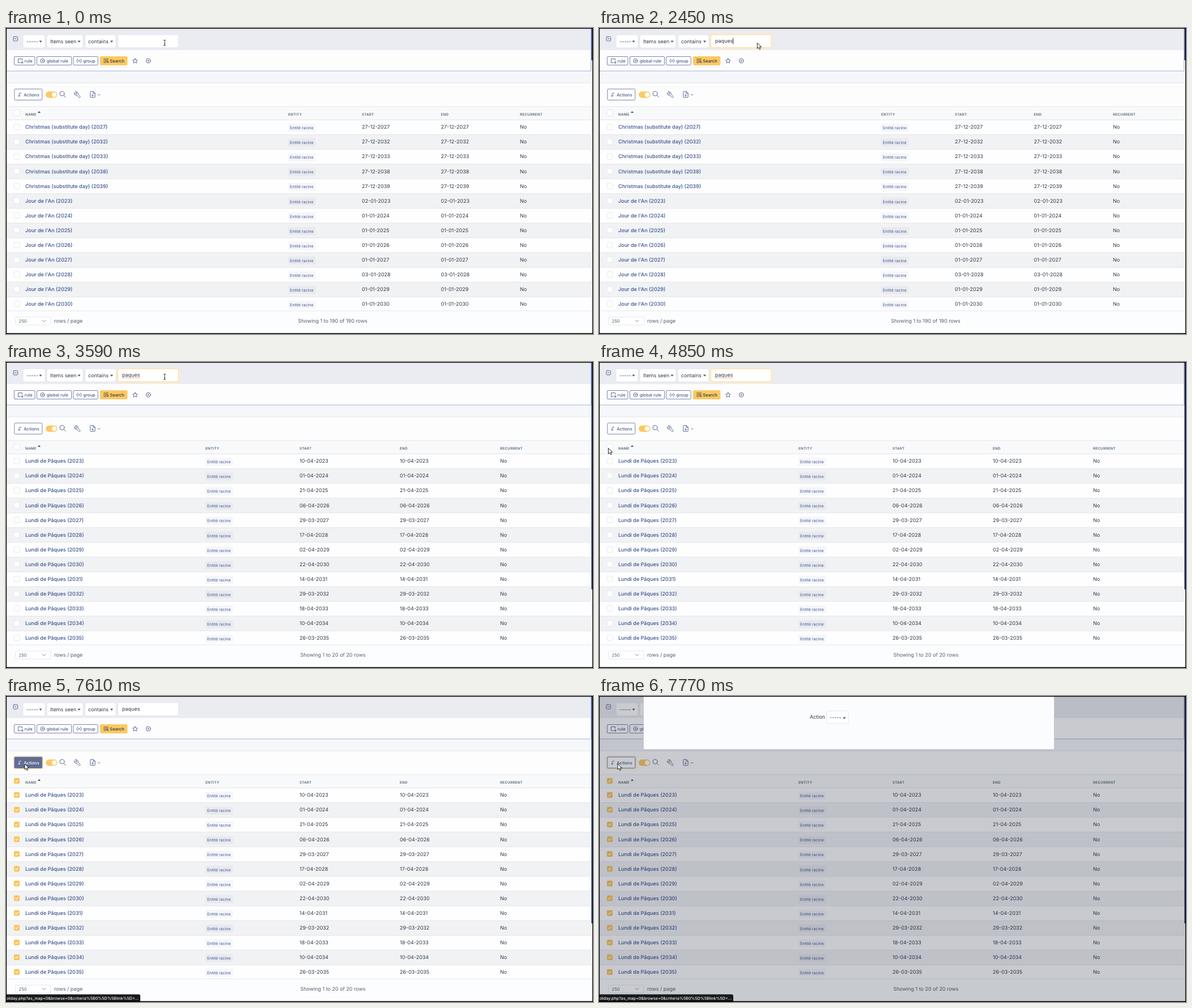
Animation of 1036x541 px, one loop 7.99 s. Source, as an HTML page:

```html
<!DOCTYPE html>
<html lang="en">
<head>
<meta charset="utf-8">
<title>Table search</title>
<style>
  html, body { margin: 0; width: 100%; height: 100%; overflow: hidden; background: #000; }
  svg { display: block; width: 100%; height: 100%; }
  text { font: 400 8.97px Inter, sans-serif; fill: #303846; white-space: pre; text-rendering: geometricPrecision; }
  .name { font-size: 9.05px; font-weight: 500; fill: #39528f; }
  .badge { font-size: 7.1px; fill: #465b93; }
  .head { font-size: 6.2px; font-weight: 600; letter-spacing: .04em; fill: #5c6474; }
  .btn { font-size: 7.6px; font-weight: 500; fill: #4a5a8a; text-anchor: middle; }
  .foot { fill: #565d6b; }
  .icon { fill: none; stroke: #4a5a8a; stroke-width: .9; stroke-linecap: round; stroke-linejoin: round; }
  .box { fill: #fff; stroke: #dfe2e8; stroke-width: .8; }
  .outline { fill: #fff; stroke: #6b78a1; stroke-width: .9; }
  .line { stroke: #e2e5e9; stroke-width: 1; }
  .gold { fill: #fcc960; }
  .halo { fill: none; stroke: #fcebc6; stroke-width: 2.4; }
</style>
</head>
<body>
<svg viewBox="0 0 1036 541">
  <defs>
    <path id="down" d="M-2.6-1.4H2.6L0 1.7Z" fill="#4b5262"/>
    <g id="empty"><rect x="-5" y="-5" width="10" height="10" rx="2" class="box"/></g>
    <g id="checked">
      <rect x="-5" y="-5" width="10" height="10" rx="1.8" fill="#f9c458"/>
      <path d="M-2.5 .1-.8 1.8 2.6-1.6" fill="none" stroke="#fff" stroke-width="1.2"/>
    </g>
  </defs>

  <rect width="1036" height="541" fill="#fdfdfe"/>
  <rect width="1033" height="39" fill="#ebecf2"/>
  <rect y="76" width="1033" height="21" fill="#f5f7fb"/>
  <path d="M0 76H1032.5V0" fill="none" stroke="#a3b2d6"/>
  <path d="M0 97H1033" class="line"/>

  <g class="icon">
    <rect x="13" y="15.3" width="7.6" height="7.6" rx="1.3"/>
    <path d="M15.2 19.1H18.4"/>
  </g>
  <rect x="30" y="12" width="39" height="23" rx="3" class="box"/>
  <text x="36" y="26.5">-----</text><use href="#down" x="61" y="24"/>
  <rect x="72" y="12" width="64" height="23" rx="3" class="box"/>
  <text x="78" y="26.5">Items seen</text><use href="#down" x="129" y="24"/>
  <rect x="139.5" y="12" width="54.5" height="23" rx="3" class="box"/>
  <text x="145" y="26.5">contains</text><use href="#down" x="186.5" y="24"/>

  <rect x="197.3" y="11.8" width="107" height="23" rx="3" class="box"/>
  <g id="inputRing" class="halo">
    <rect x="196.4" y="10.9" width="108.8" height="24.8" rx="4"/>
    <rect x="197.3" y="11.8" width="107" height="23" rx="3" style="stroke:#fbdd9d;stroke-width:.9"/>
  </g>
  <text id="typed" x="205" y="26"></text>
  <path id="spell" d="M205.5 28H236" stroke="#dd5a55" stroke-width="1.2" stroke-dasharray="1.2 1"/>
  <path id="caret" d="M0 17.5V28.5" stroke="#222" stroke-width=".9"/>

  <rect x="14.5" y="50.5" width="36.5" height="15" rx="1.5" class="outline"/>
  <rect x="54.5" y="50.5" width="61" height="15" rx="1.5" class="outline"/>
  <rect x="118.7" y="50.5" width="43.5" height="15" rx="1.5" class="outline"/>
  <rect x="166" y="50" width="48.3" height="16" rx="2" class="gold"/>
  <text x="39.8" y="60.8" class="btn">rule</text>
  <text x="90.8" y="60.8" class="btn">global rule</text>
  <text x="147" y="60.8" class="btn">group</text>
  <text x="196" y="60.8" class="btn" style="fill:#27334f">Search</text>
  <g class="icon">
    <path d="M28.5 57V54.5H21.5V61.5H25M28.5 59V63M26.5 61H30.5"/>
    <circle cx="64.5" cy="58" r="3.6"/><circle cx="64.5" cy="58" r="1"/>
    <path d="M127 55Q125.6 55 125.6 56.5T124.7 58Q125.6 58 125.6 59.5T127 61M131 55Q132.4 55 132.4 56.5T133.3 58Q132.4 58 132.4 59.5T131 61M129 56.8V59.2M127.8 58H130.2"/>
    <path d="M172.5 55H180.5M172.5 58H175.5M172.5 61H175.5" stroke="#27334f"/>
    <circle cx="178.3" cy="59" r="1.8" stroke="#27334f"/><path d="M179.7 60.4 181 61.7" stroke="#27334f"/>
    <path d="M227.8 53.8 229.1 56.6 232.1 56.9 229.9 59 230.5 62 227.8 60.5 225.1 62 225.7 59 223.5 56.9 226.5 56.6Z"/>
    <circle cx="251.2" cy="58" r="3.9"/><path d="M249.9 56.7 252.5 59.3M252.5 56.7 249.9 59.3"/>
  </g>

  <rect id="actionRing" x="13.5" y="106.6" width="51.5" height="22" rx="3" class="halo"/>
  <rect id="action" x="14.9" y="107.9" width="48.9" height="19.5" rx="1.5" class="outline"/>
  <g id="actionLabel">
    <path d="M27 115.2H24.2Q23.3 115.2 23.3 116.5V121M21.3 119.2 23.3 121.2 25.3 119.2" fill="none" stroke="currentColor" stroke-width=".9"/>
    <text x="45" y="120.7" class="btn" style="fill:currentColor">Actions</text>
  </g>
  <rect x="70" y="112.3" width="20.6" height="11.2" rx="5.6" class="gold"/>
  <circle cx="85" cy="117.9" r="4.2" fill="#fff"/>
  <g class="icon">
    <circle cx="99" cy="116" r="4"/><path d="M102 119 105.2 122.4"/>
    <path d="M122.6 112.8 124.8 115V116.8H123L120.8 114.6A3.4 3.4 0 0 0 125 119L128.6 122.6A1.4 1.4 0 0 0 130.6 120.6L127 117A3.4 3.4 0 0 0 122.6 112.8Z"/>
    <path d="M154 112.2H149.8Q148.8 112.2 148.8 113.2V121.8Q148.8 122.8 149.8 122.8H156.2Q157.2 122.8 157.2 121.8V115.4L154 112.2V115.4H157.2M153 116.8V120.6M151.3 119 153 120.7 154.7 119"/>
    <path d="M162.6 117.4 164.2 119 165.8 117.4"/>
  </g>

  <rect y="139" width="1033" height="24" fill="#f8f9fa"/>
  <path d="M0 139H1033" class="line"/>
  <path d="M56 150 58.5 147 61 150Z" fill="#3f4757"/>
  <g id="before"></g>
  <g id="after"></g>
  <rect y="500" width="1033" height="41" fill="#fcfdfe"/>
  <path d="M0 500H1033" class="line"/>
  <rect x="17" y="511" width="62" height="14" rx="2" class="box"/>
  <text x="22.6" y="520.8" class="foot" style="font-size:7.7px">250</text>
  <path d="M64 516.5 67 519.5 70 516.5" class="icon" style="stroke:#707786"/>
  <text x="85" y="521" class="foot">rows / page</text>
  <text id="count" y="521" class="foot"></text>

  <g id="checks"></g>
  <rect id="checkRing" x="12.8" y="143.8" width="12.4" height="12.4" rx="3.2" class="halo"/>

  <g id="loading">
    <rect y="163" width="1033" height="378" opacity=".1"/>
    <g transform="translate(456.3 262.4)">
      <path id="spinner" d="M10.04 10.04A14.2 14.2 0 1 1 10.04-10.04" fill="none" stroke="#232e44" stroke-width="2.6"/>
    </g>
  </g>

  <rect id="thumb" x="1033" width="2" fill="#45578a"/>
  <rect id="shade" width="1036" height="541" fill="#1d273b"/>
  <g id="modal">
    <rect x="78.5" y="-60" width="725" height="154.5" rx="2" fill="#fbfcfe" stroke="#b9bdc8" stroke-width=".8"/>
    <text x="372" y="40.3">Action</text>
    <rect x="401.5" y="26.5" width="39" height="22" rx="3" class="box"/>
    <text x="407" y="41">-----</text><use href="#down" x="433" y="39"/>
  </g>

  <g id="status">
    <path d="M0 527.4H234Q237 527.4 237 530.4V541H0Z" fill="#17191b"/>
    <text x="0" y="536.7" style="font-size:7.1px;font-weight:500;fill:#f4f4f4">oliday.php?as_map=0&amp;browse=0&amp;criteria%5B0%5D%5Blink%5D=...</text>
  </g>
  <path d="M.5 .5H1035.5V540.3H.5Z" fill="none" stroke="#000" stroke-width="1.4"/>
  <path id="beam" d="M-2-5Q0-5 0-4 0-5 2-5M0-4V4M-2 5Q0 5 0 4 0 5 2 5M-1 1.8H1" fill="none" stroke="#111" stroke-width=".85"/>
  <path id="arrow" d="M0 0V10L2.3 7.9 3.9 11.5 5.7 10.7 4.1 7.2H7.3Z" fill="#fff" stroke="#111" stroke-width=".9" stroke-linejoin="round"/>
</svg>
<script>
const LOOP = 7990, PITCH = 26.08, FIRST = 175;
const $ = id => document.getElementById(id);
const show = (id, on) => $(id).style.display = on ? '' : 'none';
const fade = (id, o) => $(id).setAttribute('opacity', o);
const clamp = v => Math.max(0, Math.min(1, v));
const text = (x, y, s, cls = '') => `<text x="${x}" y="${y}" class="${cls}">${s}</text>`;
const rowY = i => FIRST + PITCH * i;

function table(rows, [entity, start, end, recurrent]) {
  const heads = [[34, 'NAME'], [entity, 'ENTITY'], [start, 'START'], [end, 'END'], [recurrent, 'RECURRENT']];
  return heads.map(([x, s]) => text(x, 155.4, s, 'head')).join('') + rows.map(([name, date], i) => {
    const y = rowY(i), top = y - 12.6, odd = i % 2;
    return `<rect y="${top}" width="1033" height="${PITCH}" fill="${odd ? '#f1f2f4' : '#fefefe'}"/>
      <path d="M0 ${top}H1033" class="line"/>
      <rect x="${entity}" y="${y - 5.6}" width="48.5" height="14" rx="2" fill="${odd ? '#e8eaef' : '#f4f6fa'}"/>` +
      text(34, y + 3.3, name, 'name') + text(entity + 3, y + 4.1, 'Entité racine', 'badge') +
      text(start, y + 3.3, date) + text(end, y + 3.3, date) + text(recurrent, y + 3.3, 'No');
  }).join('');
}

const christmas = [2027, 2032, 2033, 2038, 2039].map(y => [`Christmas (substitute day) (${y})`, `27-12-${y}`]);
const newYear = Array.from({ length: 8 }, (_, i) => {
  const y = 2023 + i, day = { 2023: '02', 2028: '03' }[y] || '01';
  return [`Jour de l'An (${y})`, `${day}-01-${y}`];
});
const easter = '10-04 01-04 21-04 06-04 29-03 17-04 02-04 22-04 14-04 29-03 18-04 10-04 26-03'
  .split(' ').map((d, i) => [`Lundi de Pâques (${2023 + i})`, `${d}-${2023 + i}`]);

$('before').innerHTML = table([...christmas, ...newYear], [498, 628, 767.5, 907]);
$('after').innerHTML = table(easter, [352, 518, 695, 872]);
const boxes = [150, ...easter.map((_, i) => rowY(i))];
$('checks').innerHTML = boxes.map(y => `<use href="#empty" x="19" y="${y}"/>`).join('');
const marks = [...$('checks').children];

const keyTimes = [1200, 1460, 1650, 1790, 1890, 1990];
const caretOn = [[80, 610], [1120, 2510], [3050, 3590], [4130, 4660], [5190, 5330]];
const path = [[4130, 280, 26.3], [4200, 299, 17.5], [4330, 268, 42], [4580, 120, 118], [4850, 16.5, 152.3],
  [6590, 16.5, 152.3], [6830, 22, 138], [7070, 33, 120]];

function pointer(t) {
  if (t <= path[0][0]) return path[0].slice(1);
  for (let i = 1; i < path.length; i++) {
    const [t0, x0, y0] = path[i - 1], [t1, x1, y1] = path[i];
    if (t < t1) {
      const k = (t - t0) / (t1 - t0);
      return [x0 + (x1 - x0) * k, y0 + (y1 - y0) * k];
    }
  }
  return path[path.length - 1].slice(1);
}

function draw(t) {
  const done = t >= 2910, busy = t >= 2510 && !done;
  show('before', !done);
  show('after', done);
  $('count').textContent = `Showing 1 to ${done ? '20 of 20' : '190 of 190'} rows`;
  $('count').setAttribute('x', done ? 519.5 : 515.3);
  $('thumb').setAttribute('height', done ? 402 : 57);
  show('loading', busy);
  $('spinner').setAttribute('transform', `rotate(${(t - 2517) * 360 / 750})`);

  fade('inputRing', t < 5330 ? clamp((t - 40) / 230) * (t >= 80) : clamp((5500 - t) / 170));
  $('typed').textContent = 'paques'.slice(0, keyTimes.filter(k => t >= k).length);
  show('spell', t >= 3110 && t < 5330);
  show('caret', caretOn.some(([a, b]) => t >= a && t < b));
  $('caret').setAttribute('transform', `translate(${205.4 + $('typed').getComputedTextLength()})`);

  const mark = t >= 5450 ? '#checked' : '#empty';
  marks.forEach(m => m.setAttribute('href', mark));
  fade('checkRing', t < 7210 ? clamp((t - 5330) / 150) : 0);

  const open = t >= 7690 ? (t < 7770 ? .5 : 1) : 0;
  const hover = t >= 7000 && !open;
  $('action').style.fill = hover ? '#616d92' : '#fff';
  $('actionLabel').style.color = hover ? '#fff' : '#4a5a8a';
  fade('actionRing', clamp((t - 7210) / 150));
  show('status', t >= 7350);
  fade('shade', .24 * open);
  fade('modal', open);
  $('modal').setAttribute('transform', `translate(0 ${-20 * (1 - open)})`);

  const [x, y] = pointer(t);
  const beam = x > 197 && y < 36 && !(t >= 2450 && t < 2570);
  show('beam', beam);
  show('arrow', !beam);
  $(beam ? 'beam' : 'arrow').setAttribute('transform', `translate(${beam ? x : x + (t < 2570 ? -.7 : 0)} ${y})`);
}

function tick() {
  draw(performance.now() % LOOP);
  requestAnimationFrame(tick);
}
tick();
</script>
</body>
</html>
```
